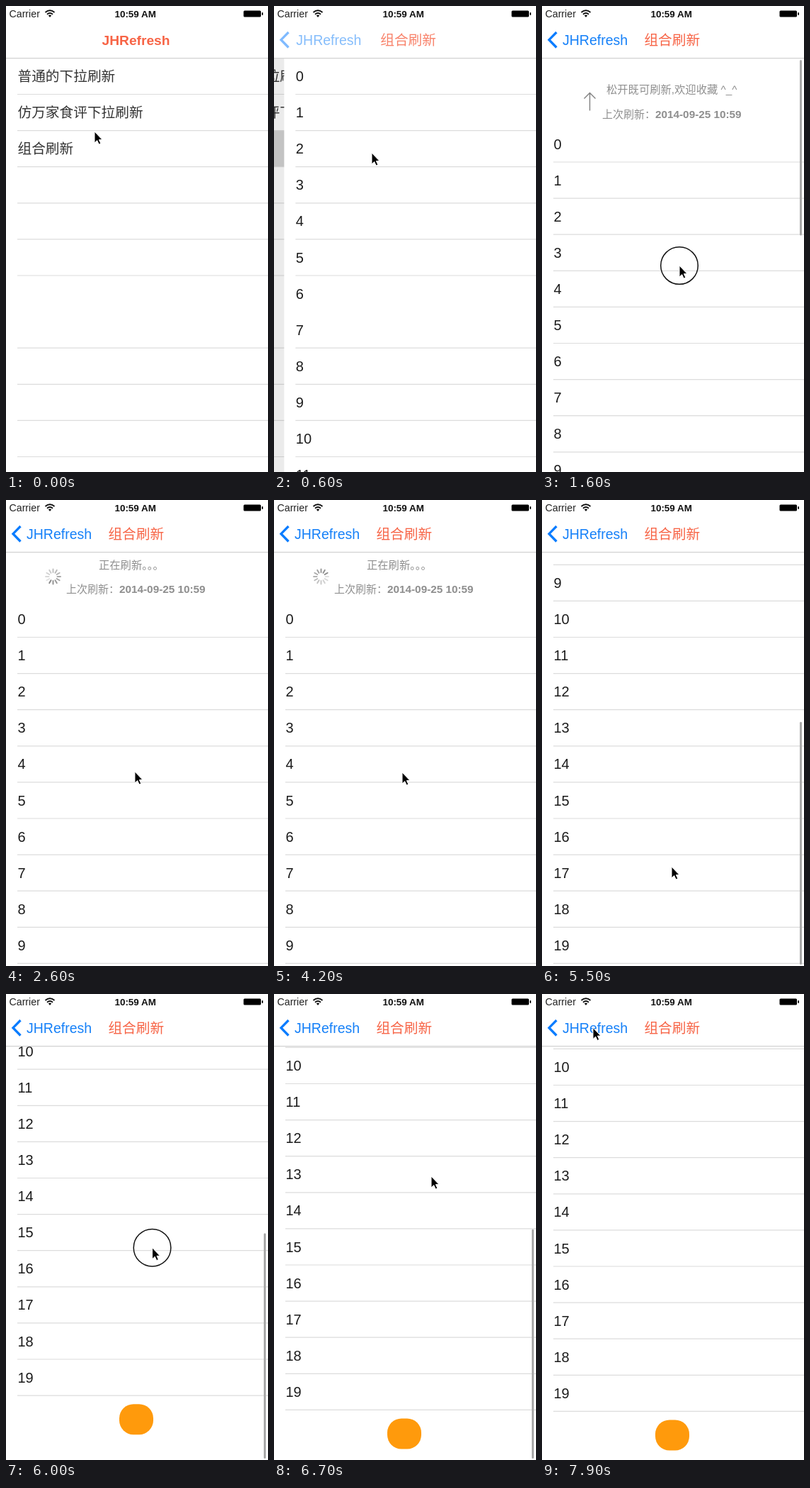
An HTML page that plays this animation: 370x657 px, repeating every 8000 ms.

```html
<!DOCTYPE html>
<html lang="zh">
<head>
<meta charset="utf-8">
<style>
  html, body { margin: 0; width: 100%; height: 100%; overflow: hidden; background: #fff; }
  svg { display: block; width: 370px; height: 657px; }
  text { font-family: "Liberation Sans", "Noto Sans CJK SC", "Noto Sans CJK JP", sans-serif; white-space: pre; }
  .row { font-size: 20px; fill: #1c1c1c; }
  .zh { font-size: 19.7px; fill: #333; font-weight: 300; }
  .title { font-size: 19.7px; fill: #f76446; }
  .hint { font-size: 15.3px; fill: #8e8e8e; }
  .line { stroke: #dcdcdc; stroke-width: 1.2; }
  .bold { font-weight: 700; }
</style>
</head>
<body>
<svg viewBox="0 0 370 657">
  <rect width="370" height="657" fill="#fff"/>

  <g id="menu">
    <rect id="highlight" y="175" width="370" height="51" fill="#d4d4d4"/>
  </g>
  <rect id="dim" y="74" width="370" height="583" fill="#000"/>

  <g id="page">
    <rect width="370" height="657" fill="#fff"/>
    <g id="content">
      <g id="header">
        <text id="hint" class="hint" y="27.5"></text>
        <text class="hint" x="85" y="62" style="font-size:15px">上次刷新：</text>
        <text class="hint bold" x="160" y="62">2014-09-25 10:59</text>
        <path id="arrow" d="M0 13V-12M-8 -4L0 -12L8 -4" fill="none" stroke="#808080" stroke-width="1.4"/>
        <g id="spinner"></g>
      </g>
      <g id="rows"></g>
      <rect x="160" y="1107.5" width="48" height="43" rx="20" fill="#ff9a0c"/>
    </g>
    <rect id="bar" x="364" width="3" rx="1.5" fill="#a9a9a9"/>
  </g>

  <rect width="370" height="73" fill="#fff"/>
  <path d="M0 73.7H370" stroke="#d2d2d2" stroke-width="1.3"/>
  <text x="4.5" y="16" font-size="14.2" fill="#222">Carrier</text>
  <path d="M55.5 9Q62 3.5 68.5 9M58 11.7Q62 8.3 66 11.7" fill="none" stroke="#111" stroke-width="1.9"/>
  <path d="M59.8 13.3Q62 11.6 64.2 13.3L62 16Z" fill="#111"/>
  <text class="bold" x="153.5" y="16" font-size="13.4" fill="#111">10:59 AM</text>
  <rect x="335.5" y="6.5" width="24.5" height="9" rx="1.5" fill="#000"/>
  <rect x="361.3" y="9" width="1.7" height="4" rx="0.8" fill="#000"/>

  <text id="rootTitle" class="title bold" y="55" style="font-size:19.2px">JHRefresh</text>
  <text id="pageTitle" class="title" y="55" font-weight="500">组合刷新</text>
  <g id="back" fill="#1580f8">
    <path d="M20.5 37L10 47.7L20.5 58.5" fill="none" stroke="#0a7cff" stroke-width="3.3"/>
    <text id="backLabel" y="55" font-size="19.5">JHRefresh</text>
  </g>

  <circle id="touch" r="26.3" fill="none" stroke="#111" stroke-width="1.5"/>
  <path id="cursor" d="M0 0V16L3.7 12.6L6.2 18L8.8 16.8L6.4 11.6H11Z" fill="#000" stroke="#fff" stroke-width="1"/>
</svg>

<script>
const NS = "http://www.w3.org/2000/svg";
const LOOP = 8000, ROW = 51.1, TOP = 73.4, BASELINE = 106;
const el = id => document.getElementById(id);
const set = (node, attrs) => { for (const k in attrs) node.setAttribute(k, attrs[k]); return node; };
const add = (parent, tag, attrs, text = "") => {
  const node = set(document.createElementNS(NS, tag), attrs);
  node.textContent = text;
  return parent.appendChild(node);
};
const clamp = (v, lo = 0, hi = 1) => Math.min(hi, Math.max(lo, v));
const smooth = p => p * p * (3 - 2 * p);
const easeOut = p => 1 - (1 - p) ** 3;
const linear = p => p;

// Keys are [time, value, easing towards this key].
function track(keys, t) {
  let prev = keys[0];
  for (const key of keys) {
    if (t < key[0]) {
      const p = clamp((t - prev[0]) / (key[0] - prev[0]));
      return prev[1] + (key[1] - prev[1]) * (key[2] || smooth)(p);
    }
    prev = key;
  }
  return prev[1];
}

const separator = (parent, y) => add(parent, "path", { class: "line", d: `M16 ${y}H370` });

const SKIPPED_LINE = 6;
["普通的下拉刷新", "仿万家食评下拉刷新", "组合刷新"].forEach((label, i) =>
  add(el("menu"), "text", { class: "zh", x: 16.5, y: BASELINE + ROW * i }, label));
for (let i = 0; i < 11; i++)
  if (i !== SKIPPED_LINE) separator(el("menu"), TOP + ROW * (i + 1));

const lines = [];
for (let i = 0; i < 20; i++) {
  add(el("rows"), "text", { class: "row", x: 16.5, y: BASELINE + ROW * i }, i);
  lines.push(separator(el("rows"), TOP + ROW * (i + 1)));
}

const spokes = [];
for (let i = 0; i < 12; i++)
  spokes.push(add(el("spinner"), "path", {
    d: "M0 -6V-10.5", stroke: "#777", "stroke-width": 2, "stroke-linecap": "round",
    transform: `translate(66.5 39) rotate(${i * 30})`
  }));

const REST = 69, RELEASE = 1950, REFRESHED = 4300, END = 439;
const scrollKeys = [
  [1050, 0], [1600, -95.5, easeOut], [1750, -100], [RELEASE, -100], [2250, -REST, easeOut],
  [REFRESHED, -REST], [4600, 0, easeOut], [4700, 0], [4950, 200, linear], [5300, 446, easeOut],
  [5500, 442], [5600, END], [6100, 530, easeOut], [6250, 532], [6550, 509, easeOut],
  [7200, 509], [7300, 507]
];
const cursorX = [[0, 125], [300, 138], [700, 138], [1000, 185], [1600, 194], [2100, 194], [2700, 181],
  [4300, 181], [4650, 186], [4950, 190], [5450, 183], [5600, 183], [6250, 218], [6600, 222], [7200, 222], [7850, 72]];
const cursorY = [[0, 177], [300, 207], [700, 207], [1000, 180], [1600, 366, easeOut], [2100, 370], [2700, 384],
  [4300, 384], [4650, 550], [4950, 340], [5450, 517], [5600, 517], [6250, 280], [6600, 257], [7200, 257], [7850, 47.5]];
const presses = [[150, 280], [1050, RELEASE], [4680, 4960], [5580, 6250]];
const barKeys = [[1050, 0], [1150, 1], [2250, 1], [2550, 0], [4700, 0], [4800, 1], [6900, 1], [7200, 0]];

function drawPush(t) {
  const left = t >= 850 ? 0 : t < 250 ? 1 : Math.exp(-(t - 250) / 108);
  set(el("page"), { transform: `translate(${370 * left} 0)` });
  set(el("menu"), { transform: `translate(${-111 * (1 - left)} 0)` });
  set(el("dim"), { opacity: 0.08 * (1 - left) });
  set(el("highlight"), { opacity: t > 180 ? 1 : 0 });
  set(el("rootTitle"), { x: 29 + 106.5 * left, opacity: clamp(1 - (t - 250) / 200) });
  set(el("pageTitle"), { x: 144.4 + 150 * left, opacity: clamp((t - 280) / 400) });
  set(el("backLabel"), { x: 29 + 60 * left });
  set(el("back"), { opacity: clamp((t - 420) / 350) });
}

function drawHeader(t, pull) {
  const busy = t >= RELEASE;
  const ready = pull >= REST;
  el("hint").textContent = busy ? "正在刷新。。。"
    : (ready ? "松开" : "下拉") + "既可刷新,欢迎收藏 ^_^";
  set(el("hint"), { x: busy ? 131 : 91 });
  const turn = 180 * clamp((REST + 8 - pull) / 8);
  set(el("arrow"), { transform: `translate(67.5 39) rotate(${turn})`, opacity: busy ? 0 : 1 });
  set(el("spinner"), { opacity: busy ? 1 : 0 });
  const head = Math.floor(t / 1000 * 12) % 12;
  spokes.forEach((spoke, i) => set(spoke, { opacity: 0.85 - 0.058 * ((head - i + 12) % 12) }));
}

function drawBar(t, scroll) {
  const length = 343 - Math.max(0, -scroll) - 0.28 * Math.max(0, scroll - END);
  set(el("bar"), {
    y: 76 + (579 - length) * clamp(scroll / END),
    height: length,
    opacity: track(barKeys, t)
  });
}

function draw(t) {
  const scroll = track(scrollKeys, t);
  drawPush(t);
  set(el("content"), { transform: `translate(0 ${-scroll})` });
  set(lines[SKIPPED_LINE], { opacity: scroll === 0 ? 0 : 1 });
  drawHeader(t, -scroll);
  drawBar(t, scroll);

  const at = `translate(${track(cursorX, t)} ${track(cursorY, t)})`;
  const pressed = presses.some(([from, to]) => t >= from && t < to);
  set(el("cursor"), { transform: at });
  set(el("touch"), { transform: at, opacity: pressed ? 1 : 0 });
}

const start = performance.now();
function frame() {
  draw((performance.now() - start) % LOOP);
  requestAnimationFrame(frame);
}
frame();
</script>
</body>
</html>
```
